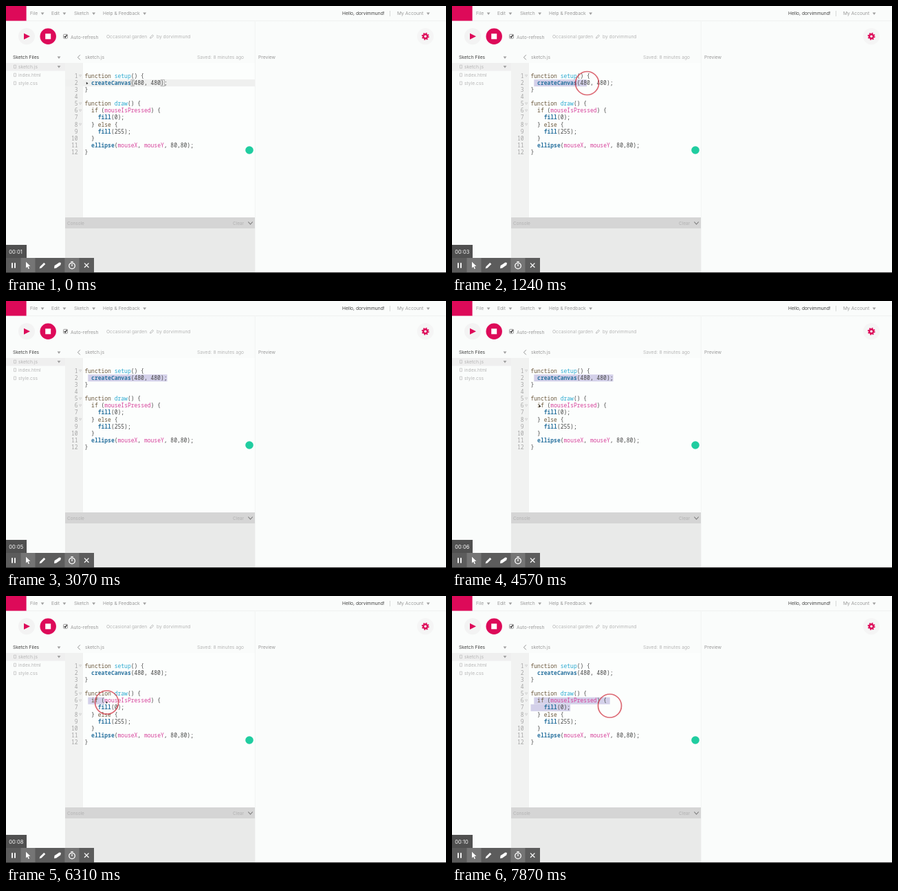
These frames come from a looping animation (640 px wide and 389 px high, 8 s). An HTML page:

```html
<!DOCTYPE html>
<html lang="en">
<head>
<meta charset="utf-8">
<title>Sketch editor</title>
<style>
html, body { margin: 0; width: 100%; height: 100%; overflow: hidden; background: #fafcfb; }
svg { display: block; width: 100vw; height: 100vh; }
text { font: 6.7px Inter, "Open Sans", sans-serif; fill: #989898; white-space: pre; }
.dark { fill: #404040; }
.pale { fill: #b6b6b6; }
.small { font-size: 6.4px; fill: #b2b2b2; }
.code text { font: 8px "Noto Sans Mono", "DejaVu Sans Mono", monospace; fill: #484848; }
.code .num { fill: #a6a6a6; text-anchor: end; }
.kw { fill: #6b583c; }
.def { fill: #2aa9d0; }
.fn { fill: #29729f; font-weight: 600; }
.var { fill: #d6409a; }
.pink { fill: #dd0a59; }
.sel { fill: #d3d0e9; }
.icon { fill: none; stroke: #fff; stroke-width: 1.3; }
#timer { font-size: 7.5px; fill: #fff; }
</style>
</head>
<body>
<svg viewBox="0 0 640 389" preserveAspectRatio="none">
  <rect width="640" height="389" fill="#fafcfb"/>

  <!-- menu bar -->
  <path d="M30 21.7H640" stroke="#dedede" stroke-width=".8" stroke-dasharray="1 1"/>
  <rect class="pink" width="29.6" height="21.6"/>
  <g id="menu"></g>
  <text x="489" y="13.3" class="dark">Hello, dorvimmund!</text>
  <text x="557.5" y="13.3" class="pale">|</text>

  <!-- tool row -->
  <circle cx="30" cy="44.3" r="12" fill="#f3f3f3"/>
  <path class="pink" d="M26 39.8L35 44.3L26 48.8Z"/>
  <circle class="pink" cx="61.2" cy="44.3" r="11.7"/>
  <rect x="57.2" y="40.3" width="8" height="8" fill="#fff"/>
  <rect x="83.5" y="41.3" width="6" height="6" rx="1" fill="#f4f4f4" stroke="#888" stroke-width=".8"/>
  <path d="M84.8 44.2L86.2 45.8L88.6 42.2" fill="none" stroke="#333" stroke-width="1.3"/>
  <text x="94" y="47.8">Auto-refresh</text>
  <text x="146" y="47" class="pale">Occasional garden</text>
  <path d="M209.6 47L210 45.2L213.2 42L214.6 43.4L211.4 46.6Z" fill="none" stroke="#aaa" stroke-width=".8"/>
  <text x="219" y="47" class="pale">by dorvimmund</text>
  <circle cx="610" cy="44.3" r="12" fill="#f5f5f5"/>
  <circle cx="610" cy="44.2" r="4.7" fill="none" stroke="#dd0a59" stroke-width="1.6" stroke-dasharray="1.85 1.84"/>
  <circle cx="610" cy="44.2" r="3" fill="none" stroke="#dd0a59" stroke-width="2.4"/>

  <!-- file list -->
  <rect y="83" width="86" height="11.5" fill="#efefef"/>
  <text x="10" y="77.2" class="dark">Sketch Files</text>
  <path d="M74.6 73.5h4.8l-2.4 3.4ZM74.6 87h4.8l-2.4 3.4Z" fill="#a0a0a0"/>
  <g id="files"></g>

  <!-- editor -->
  <path d="M107.8 71.3L104.4 74.8L107.8 78.3" fill="none" stroke="#888" stroke-width=".9"/>
  <text x="115" y="77">sketch.js</text>
  <text x="278" y="77" class="pale">Saved: 8 minutes ago</text>
  <text x="367" y="77">Preview</text>
  <rect x="86" y="83" width="276" height="225" fill="#fcfefd"/>
  <rect x="86" y="83" width="26" height="225" fill="#f1f2f1"/>
  <path d="M362.3 22V389" stroke="#f1f1f1" stroke-width=".8"/>
  <g id="active">
    <rect x="86" y="107" width="276" height="10.2" fill="#eff0ef"/>
    <path d="M181.9 107.4h4.6v9.4h-4.6ZM225.1 107.4h5.4v9.4h-5.4Z" fill="none" stroke="#a9a9a9" stroke-width=".8"/>
  </g>
  <rect id="selA" class="sel" height="10.1"/>
  <rect id="selB" class="sel" height="10.1"/>
  <g id="code" class="code"></g>
  <circle cx="354" cy="210" r="5.8" fill="#20cda0"/>

  <!-- console -->
  <rect x="86" y="308" width="276" height="16" fill="#d5d5d5"/>
  <rect x="86" y="324" width="276" height="65" fill="#e9eae9"/>
  <text x="89" y="318.6" class="small">Console</text>
  <text x="330" y="318.6" class="small">Clear</text>
  <path d="M352.3 314.5L355.5 318L358.7 314.5" fill="none" stroke="#777" stroke-width="1.1"/>

  <!-- recorder -->
  <rect y="348" width="30" height="19" fill="#505050"/>
  <text id="timer" x="4.3" y="360.8"></text>
  <rect y="367" width="128" height="21" fill="#5c5c5c"/>
  <path d="M21.5 367h21v21h-21ZM85.4 367h21v21h-21Z" fill="#757575"/>
  <path d="M0 388.5H640" stroke="#2a2a2a"/>
  <path class="icon" style="stroke-width:1.8" d="M9 374.3v7.4M13 374.3v7.4"/>
  <path d="M29 372.8L35.4 379L32.4 379.2L34 382.5L32.6 383.2L31.1 379.8L29 381.8Z" fill="#fff"/>
  <path d="M48.7 382.4L49.4 379.7L55.2 373.9L57.3 376L51.5 381.8Z" fill="#fff"/>
  <path d="M70 382.2L70.5 378.3L77.7 373.6L80 374.3L79.3 377.5L72.8 381.9Z" fill="#fff"/>
  <circle class="icon" cx="96" cy="378.6" r="4.3"/>
  <path class="icon" d="M96 376v3M94.3 372.6h3.4"/>
  <path class="icon" d="M114 374.6L120.4 381M120.4 374.6L114 381"/>

  <!-- pointer -->
  <circle id="ring" r="17" fill="none" stroke="#d0303f" stroke-opacity=".72" stroke-width="1.7"/>
  <path id="tip" d="M-1.2 -2L1.5 .5L-1.2 1.8Z" fill="#333"/>
</svg>
<script>
const LOOP = 8000, LEFT = 114.5, COL = 4.8, ROW = 10.12;
const PRESS_A = 520, RELEASE_A = 3070, PRESS_B = 5370;
const $ = id => document.getElementById(id);
const rowY = n => 102 + ROW * (n - 1);

const lines = `function setup() {
  createCanvas(480, 480);
}

function draw() {
  if (mouseIsPressed) {
    fill(0);
  } else {
    fill(255);
  }
  ellipse(mouseX, mouseY, 80,80);
}`.split('\n');

const rules = {
  kw: /^(function|if|else)$/,
  def: /^(setup|draw)$/,
  fn: /^(createCanvas|fill|ellipse)$/,
  var: /^mouse/
};

function paint(line) {
  return line.replace(/[a-z]\w*/gi, word => {
    const kind = Object.keys(rules).find(k => rules[k].test(word));
    return kind ? `<tspan class="${kind}">${word}</tspan>` : word;
  });
}

$('code').innerHTML = lines.map((line, i) => {
  const y = rowY(i + 1);
  const fold = line.endsWith('{')
    ? `<path d="M106.3 ${y - 1.6}h3.6l-1.8 2.8Z" fill="none" stroke="#c4c4c4" stroke-width=".6"/>` : '';
  return `<text class="num" x="104.5" y="${y + 2.7}">${i + 1}</text>${fold}` +
    `<text x="${LEFT}" y="${y + 2.7}">${paint(line)}</text>`;
}).join('');

$('files').innerHTML = ['sketch.js', 'index.html', 'style.css'].map((name, i) => {
  const y = 91 + 12 * i;
  return `<text class="pale" x="18" y="${y}">${name}</text>` +
    `<path d="M11.5 ${y - 4.9}h3v4.6h-3Z" fill="none" stroke="#bbb" stroke-width=".7"/>`;
}).join('');

const menu = {File: 35, Edit: 66, Sketch: 99, 'Help &amp; Feedback': 141, 'My Account': 569};
$('menu').innerHTML = Object.entries(menu)
  .map(([label, x]) => `<text x="${x}" y="13.3">${label}</text>`).join('');
for (const label of [...$('menu').children]) {
  const x = +label.getAttribute('x') + label.getComputedTextLength() + 4.6;
  label.insertAdjacentHTML('afterend', `<path d="M${x} 9.5h4.8l-2.4 3.4Z" fill="#a0a0a0"/>`);
}

// Pointer moves: start, end, x, y; it rests in between
const moves = [
  [100, PRESS_A, 120, 107],
  [PRESS_A, 1240, 196.5, 112.5],
  [1240, 2060, 235, 111],
  [RELEASE_A, 3200, 231, 105],
  [3720, 4570, 128, 153],
  [5020, PRESS_B, 120.5, 153],
  [5850, 6310, 146.5, 155],
  [6310, 7260, 212.5, 158],
  [7260, 7870, 229.5, 160]
];

function pointAt(t) {
  let x = 118, y = 112.5;
  for (const [from, to, toX, toY] of moves) {
    const k = Math.min(1, Math.max(0, (t - from) / (to - from)));
    x += (toX - x) * k;
    y += (toY - y) * k;
  }
  return [x, y];
}

const show = (id, on) => $(id).setAttribute('visibility', on ? 'visible' : 'hidden');

function select(id, row, from, to) {
  const el = $(id);
  el.setAttribute('x', from);
  el.setAttribute('y', rowY(row) - 5);
  el.setAttribute('width', Math.max(0, to - from));
}

function draw(t) {
  const [x, y] = pointAt(t);
  const second = t >= PRESS_B;
  const pressed = second || t >= PRESS_A && t < RELEASE_A;
  const row = second ? 6 : 2;
  const wrapped = second && y > 159;
  const length = lines[row - 1].length;
  const reach = pressed ? Math.floor((x - LEFT) / COL) : t < PRESS_A ? 1 : length;
  const col = Math.max(1, Math.min(reach, length));

  select('selA', row, LEFT + COL, LEFT + COL * (wrapped ? length + 1 : col));
  select('selB', 7, LEFT, wrapped ? LEFT + COL * lines[6].length : LEFT);
  show('active', t < PRESS_A);
  show('ring', pressed);
  show('tip', t < PRESS_A || t >= 3200 && t < 6400);
  for (const id of ['ring', 'tip']) $(id).setAttribute('transform', `translate(${x} ${y})`);

  const sec = Math.floor((t - 100) / 971) + 2;
  $('timer').textContent = '00:' + String(sec).padStart(2, '0');
}

const start = performance.now();
function loop() {
  draw((performance.now() - start) % LOOP);
  requestAnimationFrame(loop);
}
loop();
</script>
</body>
</html>
```
